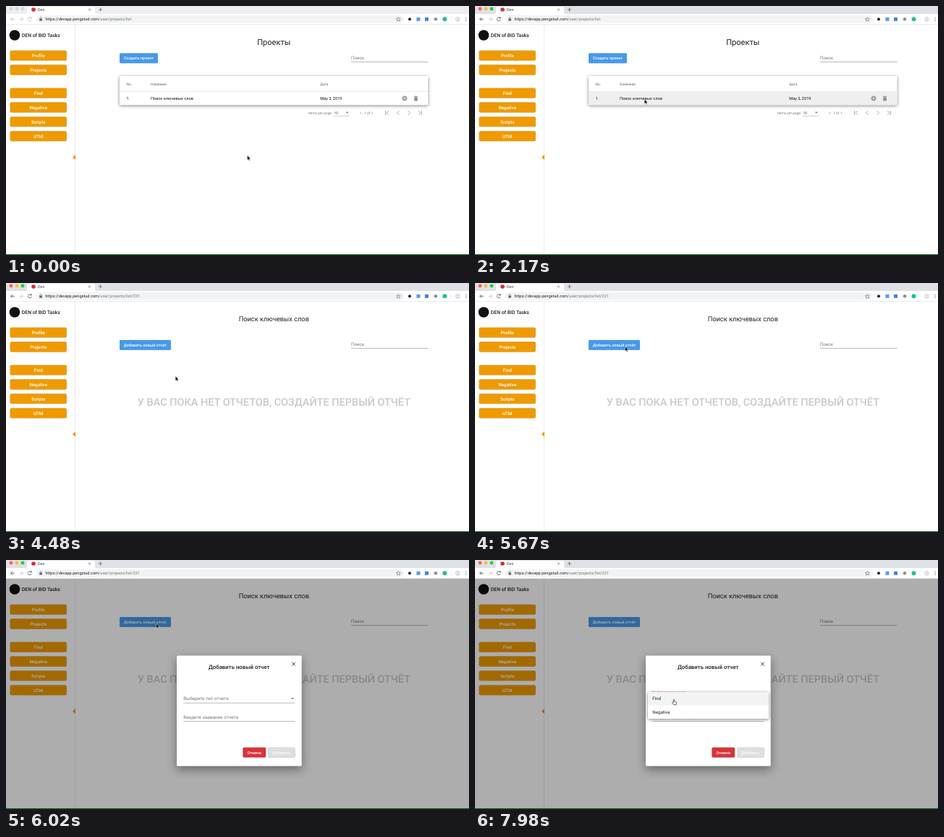
Animation of 640x345 px, one loop 8 s. Source, as an HTML page:

```html
<!DOCTYPE html>
<html lang="ru">
<head>
<meta charset="utf-8">
<style>
  html, body { margin: 0; width: 100%; height: 100%; overflow: hidden; background: #fff; }
  svg { display: block; width: 100vw; height: 100vh; }
  text { font-family: Roboto, "Open Sans", sans-serif; text-rendering: geometricPrecision; white-space: pre; }
  .raised { filter: drop-shadow(0 .7px .7px rgba(0, 0, 0, .38)); }
  .card { filter: drop-shadow(0 1.5px 2.2px rgba(0, 0, 0, .5)); }
  .modal { filter: drop-shadow(0 5px 7px rgba(0, 0, 0, .4)); }
</style>
</head>
<body>
<script>
const LOOP = 8000;
const INK = '#212121', GRAY = '#757575', ORANGE = '#ef9a00', BLUE = '#4799ea';

// Timeline, in ms
const FOCUS = 1400, OPEN_PROJECT = 2365, LOADED = 3950, OPEN_DIALOG = 5761, OPEN_SELECT = 7350;
const CURSOR_PATH = [
  [250, 333.5, 207], [1350, 234.2, 129],
  [4700, 234.2, 129], [5450, 207.5, 88],
  [6300, 207.5, 88], [7150, 275, 193]
];

// Markup helpers
const text = (x, y, size, label, fill = INK, extra = '') =>
  `<text x="${x}" y="${y}" font-size="${size}" fill="${fill}" ${extra}>${label}</text>`;
const middle = (x, y, size, label, fill, weight = 400) =>
  text(x, y, size, label, fill, `text-anchor="middle" font-weight="${weight}"`);
const rect = (x, y, w, h, fill, extra = '') =>
  `<rect x="${x}" y="${y}" width="${w}" height="${h}" fill="${fill}" ${extra}/>`;
const dot = (x, y, r, fill, extra = '') =>
  `<circle cx="${x}" cy="${y}" r="${r}" fill="${fill}" ${extra}/>`;
const stroke = (d, color, width = .8, extra = '') =>
  `<path d="${d}" fill="none" stroke="${color}" stroke-width="${width}" ${extra}/>`;
const shape = (d, fill) => `<path d="${d}" fill="${fill}"/>`;
const group = (id, body, extra = '') => `<g id="${id}" ${extra}>${body}</g>`;
const button = (x, y, w, label, fill, size = 5.5, id = '') =>
  rect(x, y, w, 13.8, fill, `rx="1.6" class="raised" ${id && `id="${id}"`}`) +
  middle(x + w / 2, y + 6.9 + size * .36, size, label, '#fff', 500);
const search = y =>
  text(477, y, 6.2, 'Поиск', GRAY) + rect(477, y + 3.4, 106.5, .6, '#8c8c8c');
const caret = (x, y) => shape(`M${x - 2} ${y - 1}h4l-2 2z`, GRAY);
const cross = (x, y, r, color, width) =>
  stroke(`M${x - r} ${y - r}l${2 * r} ${2 * r}m0 ${-2 * r}l${-2 * r} ${2 * r}`, color, width);

const browser = () => {
  const lights = ['#ff5f57', '#febc2e', '#28c840'];
  return rect(0, 0, 640, 11, '#dee1e6', 'id="strip"') +
    group('lightsOff', lights.map((_, i) => dot(7 + 8 * i, 4, 2.4, '#d5d7da')).join('')) +
    group('lightsOn', lights.map((c, i) => dot(7 + 8 * i, 4, 2.4, c)).join('')) +
    shape('M27 11q2 0 2-2V3q0-2 2-2h90q2 0 2 2v6q0 2 2 2z', '#fff') +
    dot(38, 5, 2.8, '#d32f3c') + text(44, 7, 5.4, 'Den', '#3c4043') +
    cross(115.5, 5, 1.4, '#5f6368', .7) + stroke('M130.5 2.6v4.8m-2.4-2.4h4.8', '#5f6368', .8) +
    rect(0, 11, 640, 14.5, '#fff') + rect(42, 12.8, 508, 10.8, '#f1f3f4', 'rx="5.4"') +
    stroke('M11.8 18.3H6.6m2.4-2.4l-2.4 2.4 2.4 2.4', '#5f6368', .8, 'id="back"') +
    stroke('M18.4 18.3h5.2m-2.4-2.4l2.4 2.4-2.4 2.4', '#bdc1c6') +
    stroke('M34.8 16.5a2.5 2.5 0 1 0 .5 2.4M35.2 15v2h-2', '#5f6368', .8, 'id="reload"') +
    rect(46.3, 17.6, 3.6, 2.9, '#5f6368') + stroke('M47 17.8v-1a1.1 1.1 0 0 1 2.2 0v1', '#5f6368', .6) +
    `<text x="54.5" y="20.3" font-size="5.6" fill="#202124">https://devapp.pengstud.com` +
    `<tspan id="urlPath" fill="#70757a"></tspan></text>` +
    stroke('M542.4 15.4l.9 2 2.1.2-1.6 1.4.5 2.1-1.9-1.1-1.9 1.1.5-2.1-1.6-1.4 2.1-.2z', '#5f6368', .6) +
    dot(558, 18.3, 2, '#222') + rect(567.5, 15.8, 5, 5, '#5b9be6') + rect(579, 15.8, 5, 5, '#4a80d9') +
    dot(594, 18.3, 2.3, '#8a8d91') + dot(606.5, 18.3, 3, '#20c48a') +
    rect(614.8, 14.5, .5, 7.5, '#dadce0') +
    dot(624.5, 18.3, 3, 'none', 'stroke="#aeb1b5" stroke-width=".6"') + dot(624.5, 17.5, 1, '#aeb1b5') +
    stroke('M622.7 20.3q1.8-1.8 3.6 0', '#aeb1b5', .7) +
    [16.2, 18.3, 20.4].map(y => dot(636, y, .6, '#5f6368')).join('') +
    rect(0, 25, 640, .6, '#dcdee1');
};

const sidebar = () =>
  rect(95.2, 25.6, .6, 318.4, '#e0e0e0') +
  dot(12, 40.5, 7.3, '#111') + text(21.8, 42.9, 6.85, 'DEN of BID Tasks', INK, 'font-weight="500"') +
  [['Profile', 68.6], ['Projects', 88.5], ['Find', 120.6], ['Negative', 140.5], ['Scripts', 160.4], ['UTM', 180.3]]
    .map(([label, y]) => button(5.7, y - 6.9, 78, label, ORANGE, 6.2)).join('') +
  shape('M92 209.5l4-3.8v7.6z', ORANGE);

const gear = dot(551, 128, 2, 'none', 'stroke="#8f8f8f" stroke-width="1.5"') +
  dot(551, 128, 3.1, 'none', 'stroke="#8f8f8f" stroke-width="1.3" pathLength="16" stroke-dasharray="1"');
const trash = shape('M563.8 125.2h1.5l.5-.6h1.5l.5.6h1.5v.8h-5.5zM564.2 126.6h4.7v4.2q0 .8-.8.8h-3.1q-.8 0-.8-.8z', '#8f8f8f');

const listPage = () =>
  middle(370.3, 54, 11.1, 'Проекты') + button(157, 65.4, 53, 'Создать проект', BLUE) + search(73.6) +
  rect(157, 97, 426.5, 40.3, '#fff', 'rx="1" class="card"') +
  rect(157, 119, 426.5, 18.3, '#eeeff0', 'id="rowHover"') + rect(157, 118.4, 426.5, .6, '#dedede') +
  [[166.5, 'No.'], [200, 'Название'], [434.3, 'Дата']].map(([x, s]) => text(x, 109.8, 4.8, s, '#616161')).join('') +
  [[166.5, '1'], [200, 'Поиск ключевых слов'], [434.3, 'May 3, 2019']].map(([x, s]) => text(x, 130, 5.6, s, '#111')).join('') +
  gear + trash +
  text(418, 149.6, 4.8, 'Items per page:', GRAY) + text(453.5, 149.8, 4.9, '10', '#444') +
  rect(453, 152, 21.5, .5, '#9a9a9a') + caret(471.8, 147.8) + text(488.8, 149.6, 4.8, '1 - 1 of 1', GRAY) +
  stroke('M524.5 145v6m4.5-6l-3 3 3 3M543.5 145l-3 3 3 3M555.5 145l3 3-3 3M570 145l3 3-3 3m4.5-6v6', '#9a9a9a', .8);

const reportPage = () =>
  group('reportTop', button(157, 79, 71, 'Добавить новый отчёт', BLUE) + search(87)) +
  dot(370, 131, 17.6, 'none', `id="spinner" stroke="${ORANGE}" stroke-width="4" pathLength="360"`) +
  group('reportBody', middle(370.3, 52.5, 9.25, 'Поиск ключевых слов') +
    middle(370.4, 169.5, 14.47, 'У ВАС ПОКА НЕТ ОТЧЕТОВ, СОЗДАЙТЕ ПЕРВЫЙ ОТЧЁТ', '#c9c9c9', 500));

const dialog = () =>
  rect(236, 132.5, 172.7, 153, '#fff', 'rx="1.6" class="modal"') +
  middle(322.2, 151, 7.8, 'Добавить новый отчет', INK, 500) + cross(397.5, 144.1, 2.3, '#222', .9) +
  group('typeLabel', text(0, 0, 6.35, 'Выберите тип отчета', 'currentColor')) +
  caret(396, 192) + rect(245.3, 197.8, 154, .6, '#8c8c8c') +
  text(245.3, 220, 6.35, 'Введите название отчета', GRAY) + rect(245.3, 223.2, 154, .6, '#8c8c8c') +
  button(327.5, 259.7, 31.6, 'Отмена', '#d8343a', 5.4, 'cancel') +
  button(362, 259.7, 37.5, 'Добавить', '#dedede', 5.4, 'submit') +
  group('options', rect(239, 183, 167, 37, '#fff', 'rx="1" class="card"') + rect(239, 183, 167, 18.5, '#f3f3f3') +
    text(245.3, 194.4, 6.2, 'Find') + text(245.3, 212.9, 6.2, 'Negative'));

const pointers = () => group('pointer',
  `<path id="arrow" d="M0 0v6.6l1.5-1.3 1 2.3 1.2-.5-1-2.3h2z" fill="#000" stroke="#fff" stroke-width=".5"/>` +
  `<path id="hand" d="M-.7.5q.7-1 1.3 0v2.6l2.2.5q.9.3.8 1.2l-.6 2.7h-3.4l-2-2.7q-.2-1 .8-.7l.9.7z" fill="#fff" stroke="#111" stroke-width=".6"/>`);

document.body.innerHTML = `<svg viewBox="0 0 640 345" preserveAspectRatio="none">
  ${rect(0, 0, 640, 345, '#fff')}${sidebar()}
  ${group('listPage', listPage())}${group('reportPage', reportPage())}
  ${rect(0, 25.6, 640, 318.4, '#000', 'id="backdrop"')}
  ${browser()}${group('dialog', dialog())}
  ${rect(0, 344, 640, 1, '#0b5a18')}${pointers()}</svg>`;

const el = id => document.getElementById(id);
const set = (id, name, value) => el(id).setAttribute(name, value);
const show = (id, on) => set(id, 'visibility', on ? 'inherit' : 'hidden');
const progress = (t, start, length) => Math.min(1, Math.max(0, (t - start) / length));

function bezier(x1, y1, x2, y2) {
  const curve = (a, b, s) => 3 * (1 - s) ** 2 * s * a + 3 * (1 - s) * s * s * b + s ** 3;
  return x => {
    let low = 0, high = 1;
    for (let i = 0; i < 22; i++) {
      const mid = (low + high) / 2;
      if (curve(x1, x2, mid) < x) low = mid; else high = mid;
    }
    return curve(y1, y2, low);
  };
}
const easeMove = bezier(.4, 0, .3, 1);
const easeSpin = bezier(.35, 0, .25, 1);
const easeFade = bezier(.25, .8, .25, 1);
const easeEnter = bezier(0, 0, .2, 1);

function cursorAt(t) {
  let [, x, y] = CURSOR_PATH[0];
  for (let i = 1; i < CURSOR_PATH.length; i++) {
    const [start, x0, y0] = CURSOR_PATH[i - 1], [end, x1, y1] = CURSOR_PATH[i];
    if (t < start) break;
    const k = easeMove(progress(t, start, end - start));
    x = x0 + (x1 - x0) * k;
    y = y0 + (y1 - y0) * k;
  }
  return [x, y];
}

// The arc grows from its tail, then shrinks towards its head; each cycle moves on by 270 degrees.
function drawSpinner(t) {
  const seconds = (t - OPEN_PROJECT) * 1.5 / 1000;
  const cycle = Math.floor(seconds), phase = seconds - cycle;
  const growing = phase < .5;
  const k = easeSpin(growing ? phase * 2 : phase * 2 - 1);
  const length = growing ? 18 + 270 * k : 288 - 270 * k;
  const tail = 270 * cycle + (growing ? 0 : 288 - length);
  set('spinner', 'stroke-dasharray', `${length} 360`);
  set('spinner', 'transform', `rotate(${tail + 180 * seconds - 90} 370 131)`);
}

function drawDialog(t) {
  show('dialog', t >= OPEN_DIALOG);
  set('backdrop', 'opacity', .32 * easeFade(progress(t, OPEN_DIALOG, 267)));
  const enter = easeEnter(progress(t, OPEN_DIALOG, 100));
  const scale = .7 + .3 * enter;
  set('dialog', 'opacity', enter);
  set('dialog', 'transform', `translate(322.4 209) scale(${scale}) translate(-322.4 -209)`);
  const fill = progress(t, OPEN_DIALOG + 20, 140);
  set('cancel', 'fill-opacity', fill);
  set('submit', 'fill-opacity', fill);

  const float = easeFade(progress(t, OPEN_SELECT, 260));
  set('typeLabel', 'transform', `translate(245.3 ${194.4 - 9.4 * float}) scale(${1 - .25 * float})`);
  set('typeLabel', 'color', t < OPEN_SELECT ? GRAY : '#e0555a');
  const drop = progress(t, OPEN_SELECT, 90);
  show('options', drop > 0);
  set('options', 'opacity', drop);
  set('options', 'transform', `translate(0 183) scale(1 ${.8 + .2 * drop}) translate(0 -183)`);
}

function draw(t) {
  const focused = t >= FOCUS, inProject = t >= OPEN_PROJECT, loaded = t >= LOADED;
  set('strip', 'fill', focused ? '#dee1e6' : '#eceef0');
  show('lightsOn', focused);
  show('lightsOff', !focused);
  for (const id of ['back', 'reload']) set(id, 'stroke', focused ? '#4a4d51' : '#b4b7bb');
  el('urlPath').textContent = '/user/projects/list' + (inProject ? '/221' : '');

  const [x, y] = cursorAt(t);
  show('listPage', !inProject);
  show('rowHover', focused && y > 119 && y < 137);
  show('reportPage', inProject);
  show('spinner', inProject && !loaded);
  show('reportBody', inProject && loaded);
  set('reportTop', 'transform', `translate(0 ${loaded ? 0 : -11})`);
  drawSpinner(t);
  drawDialog(t);

  const overOption = t >= OPEN_SELECT + 60;
  set('pointer', 'transform', `translate(${x} ${y})`);
  show('arrow', !overOption);
  show('hand', overOption);
}

const started = performance.now();
function tick() {
  draw((performance.now() - started) % LOOP);
  requestAnimationFrame(tick);
}
tick();
</script>
</body>
</html>
```
